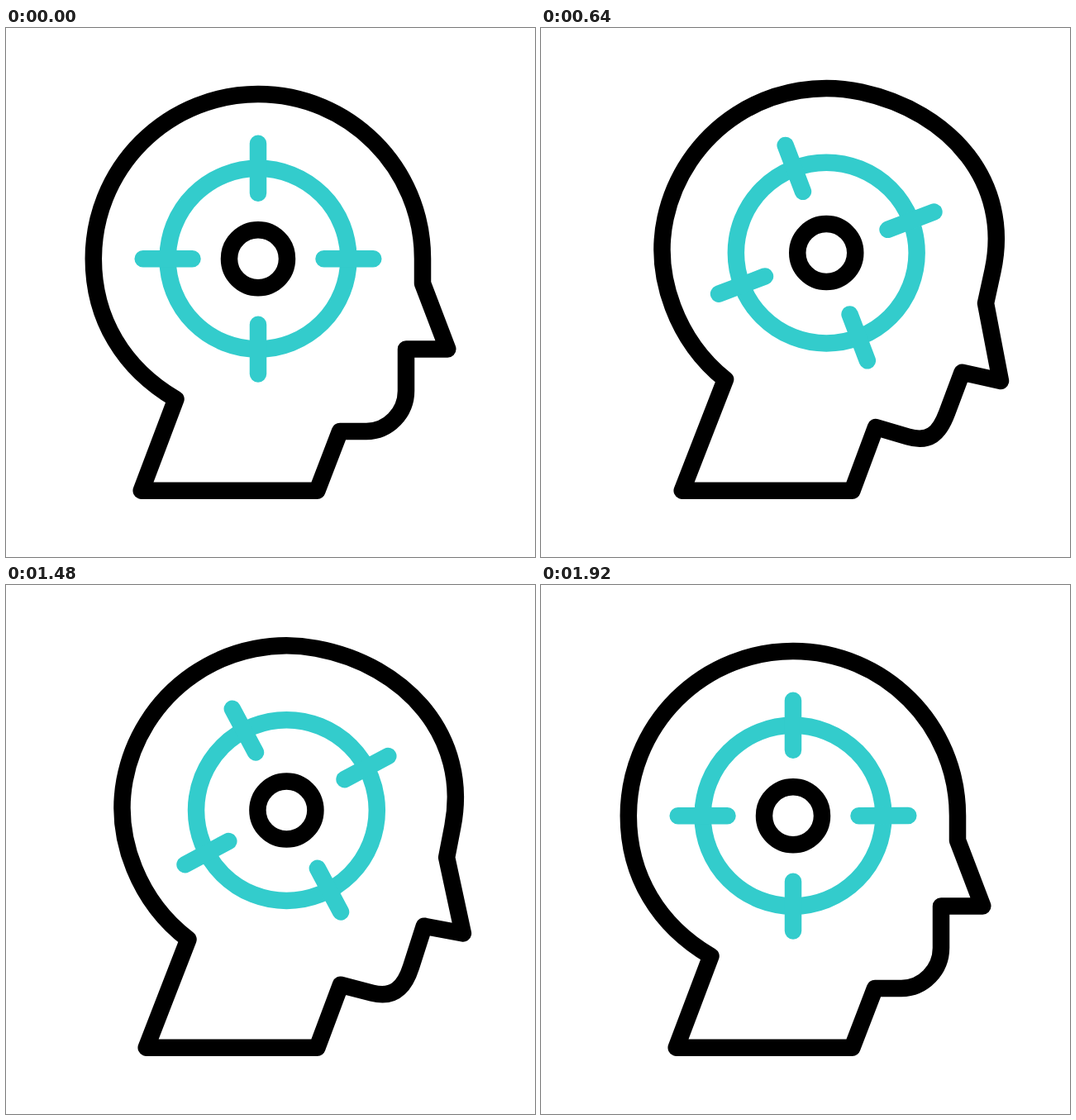
Write an HTML page that moves like this. It is 640x640 px and loops after 2000 ms.

```html
<!DOCTYPE html>
<html>
<head>
<meta charset="utf-8">
<style>
  html, body { margin: 0; height: 100%; overflow: hidden; background: #fff; }
  svg { display: block; width: 100vw; height: 100vh; }
  g { fill: none; stroke: #000; stroke-width: 20.5; stroke-linecap: round; stroke-linejoin: round; }
  .aim { stroke: #3cc; }
</style>
</head>
<body>
<svg viewBox="0 0 640 640">
  <g>
    <path id="head"/>
    <circle id="pupil"/>
  </g>
  <g class="aim">
    <circle id="ring" r="109.4"/>
    <path id="arms"/>
  </g>
</svg>
<script>
const LOOP = 2000, STEP = 40;
const TILT = 12.2;      // degrees the head leans forward
const SKULL = 199.2;    // radius of the back of the head
const $ = id => document.getElementById(id);

function ease(t, from, to) {
  const x = Math.min(1, Math.max(0, (t - from) / (to - from)));
  return x * x * (3 - 2 * x);
}

// Point at a clockwise angle from straight up.
function polar([x, y], r, deg) {
  const a = deg * Math.PI / 180;
  return [x + r * Math.sin(a), y - r * Math.cos(a)];
}

// Point on the line from a through b, a given length past b.
function past(a, b, length) {
  const k = length / Math.hypot(b[0] - a[0], b[1] - a[1]);
  return [b[0] + k * (b[0] - a[0]), b[1] + k * (b[1] - a[1])];
}

// Point beside p, clockwise along the tangent of the circle around c.
function beside(c, p, length) {
  return past([p[0] + p[1] - c[1], p[1] - p[0] + c[0]], p, length);
}

function headPath(center, lean) {
  const key = (x, y, dx, dy) => [x + dx * lean, y + dy * lean];
  const brow = key(504, 309, 34, 24);
  const front = key(504, 279, 42.5, 15);
  const neck = key(205.5, 449, 17.5, -23.7);
  const back = key(163.7, 559.7, 7, 0);
  const base = key(376.5, 559.7, 0, 0);
  const chin = key(404, 488, 1, -5);
  const jaw = key(436, 488, 8, 6.5);
  const lip = key(484, 439, 7, 27);
  const nostril = key(484, 388.5, 25.5, 28.2);
  const tip = key(534.3, 388.5, 21.7, 38.5);
  const crown = polar(center, SKULL, TILT * lean);
  const rear = polar(center, SKULL, TILT * lean - 90);

  return `M${brow}L${front}
    C${past(brow, front, 110)} ${beside(center, crown, 110)} ${crown}
    A${SKULL} ${SKULL} 0 0 0 ${rear}
    C${beside(center, rear, -73)} ${beside(center, neck, 73)} ${neck}
    L${back}L${base}L${chin}L${jaw}
    C${past(chin, jaw, 26.5)} ${past(nostril, lip, 26.5)} ${lip}
    L${nostril}L${tip}Z`;
}

function armsPath(center, turn, pulse) {
  let d = '';
  for (let i = 0; i < 4; i++) {
    const stretch = i % 2 ? 16 : 22;
    const end = r => polar(center, r, turn + 90 * i);
    d += `M${end(79.5)}L${end(139.3 + stretch * pulse)}`;
  }
  return d;
}

function set(id, attrs) {
  for (const name in attrs) $(id).setAttribute(name, attrs[name]);
}

function draw(t) {
  const back = ease(t, 1342, 1922);
  const lean = ease(t, 115, 400) - back;
  const spin = ease(t, 206, 786) - back;
  const pulse = ease(t, 801, 1091) - ease(t, 1091, 1381);
  const center = polar([358, 464], 192.3, TILT * lean - 16);
  const [cx, cy] = center;

  set('head', { d: headPath(center, lean) });
  set('pupil', { cx, cy, r: 35 + 6.9 * pulse });
  set('ring', { cx, cy });
  set('arms', { d: armsPath(center, TILT * lean - 360 * spin, pulse) });
}

const start = performance.now();
function tick() {
  const t = (performance.now() - start) % LOOP;
  draw(Math.floor(t / STEP) * STEP);
  requestAnimationFrame(tick);
}
tick();
</script>
</body>
</html>
```
